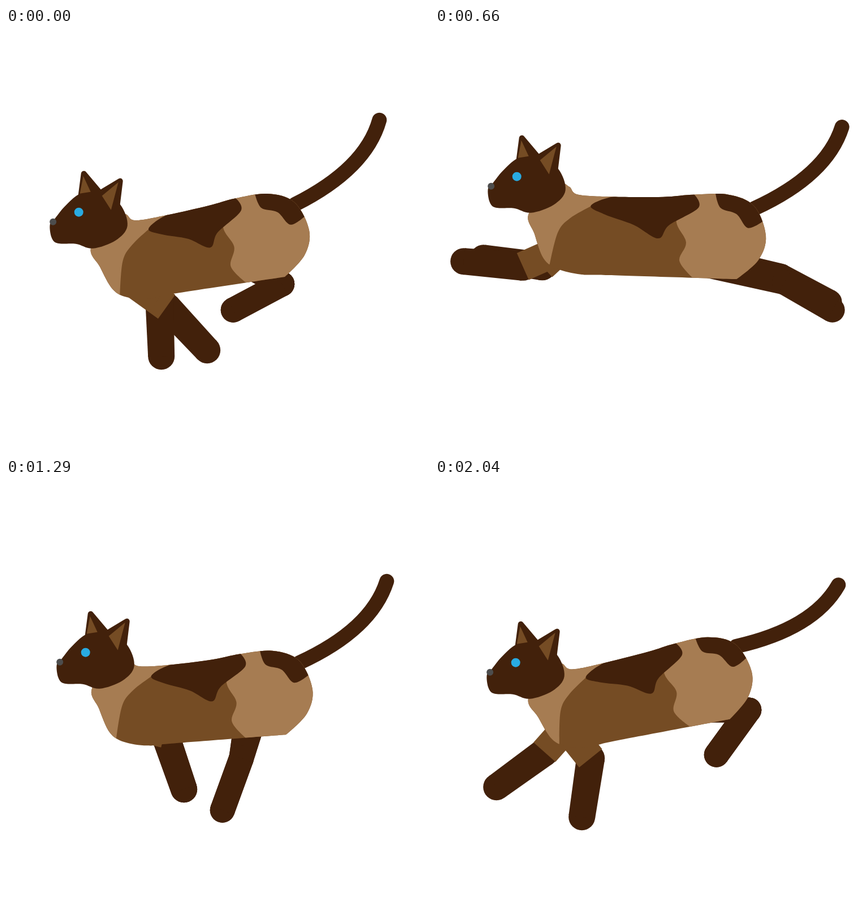
Recreate the animation shown at these times as an HTML page with a canvas. Size 748x748 px, loop 2.07 s.

```html
<!DOCTYPE html>
<html lang="en">
<head>
<meta charset="utf-8">
<title>Running cat</title>
<style>
html, body { margin: 0; width: 100%; height: 100%; overflow: hidden; background: #fff; }
canvas { display: block; width: 748px; height: 748px; }
</style>
</head>
<body>
<canvas id="stage" width="748" height="748"></canvas>
<script>
const ctx = document.getElementById('stage').getContext('2d');
const DARK = '#42210b', MID = '#754c24', TAN = '#a67c52';
const LOOP = 2070, STEP = 30;

// Chest and hip: x, y, turn. Paws: x, y, direction of the lower leg. Tail: lift.
const land = {
  chest: [207, 393, -10.5], hip: [470, 378, -5], eye: [128, 325], tail: [45],
  foreA: [274, 580, 88], foreB: [355, 569, 47],
  hindA: [401, 498, 152], hindB: [401, 498, 152]
};
const gather = {
  chest: [208, 381, -5], hip: [475, 389, -2.5], eye: [140, 306], tail: [43],
  foreA: [314, 548, 71], foreB: [314, 548, 71],
  hindA: [382, 585, 110], hindB: [382, 585, 110]
};
const push = {
  chest: [212, 364, 0], hip: [481, 387, 0], eye: [145, 285], tail: [49.5],
  foreA: [258, 551, 95.5], foreB: [296, 545, 75],
  hindA: [403, 591, 107], hindB: [441, 600, 97]
};
const stretch = {
  chest: [221, 342, -1], hip: [517, 380, 1.5], eye: [144, 262], tail: [43],
  foreA: [50, 412, 185], foreB: [85, 406, 188],
  hindA: [697, 484, 28], hindB: [702, 498, 30]
};
const dive = {
  chest: [222, 390, -13], hip: [495, 364, -8], eye: [142, 324], tail: [31],
  foreA: [108, 544, 144], foreB: [259, 597, 98.5],
  hindA: [497, 487, 126], hindB: [497, 487, 126]
};
const touch = {
  chest: [209, 408, -12.5], hip: [478, 380, -8.5], eye: [130, 339], tail: [37],
  foreA: [228, 584, 111.5], foreB: [351, 584, 56],
  hindA: [379, 516, 153], hindB: [379, 516, 153]
};
const RUN = [[30, land], [210, gather], [270, push], [660, stretch], [960, dive],
  [1080, touch], [1290, gather], [1350, push], [1740, stretch], [2040, dive]];

// Body shapes in the push pose; a doubled point is a corner
const BODY = [210,300, 228,302, 243,316, 302,318, 375,313, 422,305, 480,301, 526,320,
  548,372, 536,415, 498,450, 498,450, 290,457, 245,457, 205,447, 181,428, 166,385, 157,347];
const SADDLE = [263,335, 302,317, 360,314, 422,303, 422,303, 431,327, 385,362, 368,387,
  330,366, 285,350];
const RUMP = [458,299, 458,299, 467,325, 495,335, 516,359, 543,346, 543,346, 540,300];
const HIP = [420,290, 396,350, 412,390, 402,424, 426,454, 426,454, 520,470, 580,380, 510,280];
const CHEST = [200,290, 304,312, 268,333, 228,358, 207,383, 192,438, 192,438, 168,445, 135,340];
// Head shapes relative to the eye
const HEAD = [1,-32, -25,-10, -42,11, -51,22, -48,45, -37,55, -5,56, 25,64, 65,50,
  86,24, 73,-14, 36,-40];
const EARS = [[4,-30, 9,-68, 36,-36], [43,-37, 73,-55, 68,-14]];
const INNER = [[2,-33, 8,-64, 21,-36], [41,-29, 70,-53, 57,-4]];

const pairs = a => Array.from({ length: a.length / 2 }, (_, i) => [a[2 * i], a[2 * i + 1]]);
const same = (a, b) => a[0] === b[0] && a[1] === b[1];
const mix = (a, b, w) => a.map((v, i) => v + (b[i] - v) * w);
const shift = ([x, y], dx, dy) => [x + dx, y + dy];
// Point at a length and an angle in degrees
const polar = (p, r, deg) =>
  shift(p, r * Math.cos(deg * Math.PI / 180), r * Math.sin(deg * Math.PI / 180));
// Offset carried by a turned bone
const attach = ([x, y, turn], dx, dy) => polar(polar([x, y], dx, turn), dy, turn + 90);

// Cubic interpolation through unevenly spaced poses
function tween(t, part) {
  const last = RUN.length - 1;
  t = Math.max(t, RUN[0][0]);
  let i = 0;
  while (i < last - 1 && t >= RUN[i + 1][0]) i++;
  const keys = [i - 1, i, i + 1, i + 2].map(n => RUN[Math.min(Math.max(n, 0), last)]);
  const [t0, t1, t2, t3] = keys.map(k => k[0]);
  const [a, b, c, e] = keys.map(k => k[1][part]);
  const d = t2 - t1, s = (t - t1) / d;
  return b.map((v, n) => {
    const m1 = (c[n] - a[n]) / (t2 - t0) * d, m2 = (e[n] - v) / (t3 - t1) * d;
    const ease = s * s * (3 - 2 * s);
    return v + (c[n] - v) * ease + s * (1 - s) * (m1 * (1 - s) - m2 * s);
  });
}

// Blend from chest to hip along the back
function bender(chest, hip) {
  const [cx, cy] = push.chest, [hx, hy] = push.hip;
  return ([x, y]) => {
    const s = Math.min(Math.max((x - 200) / 290, 0), 1);
    return mix(attach(chest, x - cx, y - cy), attach(hip, x - hx, y - hy), s * s * (3 - 2 * s));
  };
}

// Smooth closed path
function blob(pts, color) {
  const n = pts.length, at = i => pts[(i + n) % n];
  ctx.beginPath();
  ctx.moveTo(...pts[0]);
  for (let i = 0; i < n; i++) {
    const a = at(i - 1), b = at(i), c = at(i + 1), d = at(i + 2);
    if (same(b, c)) continue;
    const u = same(a, b) ? b : [b[0] + (c[0] - a[0]) / 6, b[1] + (c[1] - a[1]) / 6];
    const v = same(c, d) ? c : [c[0] - (d[0] - b[0]) / 6, c[1] - (d[1] - b[1]) / 6];
    ctx.bezierCurveTo(...u, ...v, ...c);
  }
  ctx.closePath();
  ctx.fillStyle = color;
  ctx.fill();
}
function poly(pts, color, round = 0) {
  ctx.beginPath();
  pts.forEach(p => ctx.lineTo(...p));
  ctx.closePath();
  ctx.fillStyle = ctx.strokeStyle = color;
  ctx.fill();
  if (!round) return;
  ctx.lineWidth = 2 * round;
  ctx.lineJoin = 'round';
  ctx.stroke();
}
function disc(p, r, color) {
  ctx.beginPath();
  ctx.arc(...p, r, 0, 2 * Math.PI);
  ctx.fillStyle = color;
  ctx.fill();
}

// Tapered bone with round ends
function limb(p, q, r1, r2) {
  const side = Math.atan2(q[1] - p[1], q[0] - p[0]) * 180 / Math.PI + 90;
  disc(p, r1, DARK);
  disc(q, r2, DARK);
  poly([polar(p, r1, side), polar(q, r2, side), polar(q, -r2, side), polar(p, -r1, side)], DARK);
}

function drawTail(hip, [lift]) {
  const base = attach(hip, 46, -63);
  const bend = polar(polar(base, 133, -lift), 44, 90 - lift);
  ctx.beginPath();
  ctx.moveTo(...base);
  ctx.quadraticCurveTo(...bend, ...polar(base, 211, -lift));
  ctx.strokeStyle = DARK;
  ctx.lineWidth = 26;
  ctx.lineCap = 'round';
  ctx.stroke();
}

function drawHind(hip, [x, y, deg]) {
  const knee = polar([x, y], -98, deg);
  limb(attach(hip, -45, 32), knee, 28, 22);
  limb(knee, [x, y], 22, 22);
}

function drawFore(chest, paws) {
  const shoulder = attach(chest, -2, 50);
  const elbows = paws.map(([x, y, deg]) => polar([x, y], -105, deg));
  paws.forEach(([x, y], i) => limb(elbows[i], [x, y], 25, 23.5));
  ctx.strokeStyle = MID;
  ctx.lineWidth = 52;
  ctx.lineCap = 'butt';
  for (const elbow of elbows) {
    ctx.beginPath();
    ctx.moveTo(...shoulder);
    ctx.lineTo(...elbow);
    ctx.stroke();
  }
}

function drawBody(chest, hip) {
  const bend = bender(chest, hip);
  const paint = (shape, color) => blob(pairs(shape).map(bend), color);
  paint(BODY, MID);
  ctx.save();
  ctx.clip();
  paint(CHEST, TAN);
  paint(HIP, TAN);
  paint(SADDLE, DARK);
  paint(RUMP, DARK);
  ctx.restore();
}

function drawHead(eye) {
  const place = shape => pairs(shape).map(p => shift(p, ...eye));
  EARS.forEach(ear => poly(place(ear), DARK, 5));
  blob(place(HEAD), DARK);
  INNER.forEach(ear => poly(place(ear), MID));
  disc(shift(eye, -45.5, 17), 6, '#4d4d4d');
  disc(eye, 8, '#29abe2');
}

function draw(now) {
  const t = Math.floor((now % LOOP) / STEP) * STEP;
  const pose = part => tween(t, part);
  const chest = pose('chest'), hip = pose('hip');
  ctx.setTransform(1, 0, 0, 1, 0, 0);
  ctx.fillStyle = '#fff';
  ctx.fillRect(0, 0, 748, 748);
  ctx.translate(0.7, 0.7);
  drawTail(hip, pose('tail'));
  drawHind(hip, pose('hindA'));
  drawHind(hip, pose('hindB'));
  drawFore(chest, [pose('foreB'), pose('foreA')]);
  drawBody(chest, hip);
  drawHead(pose('eye'));
}

const start = performance.now();
function tick() {
  draw(performance.now() - start);
  requestAnimationFrame(tick);
}
tick();
</script>
</body>
</html>
```
